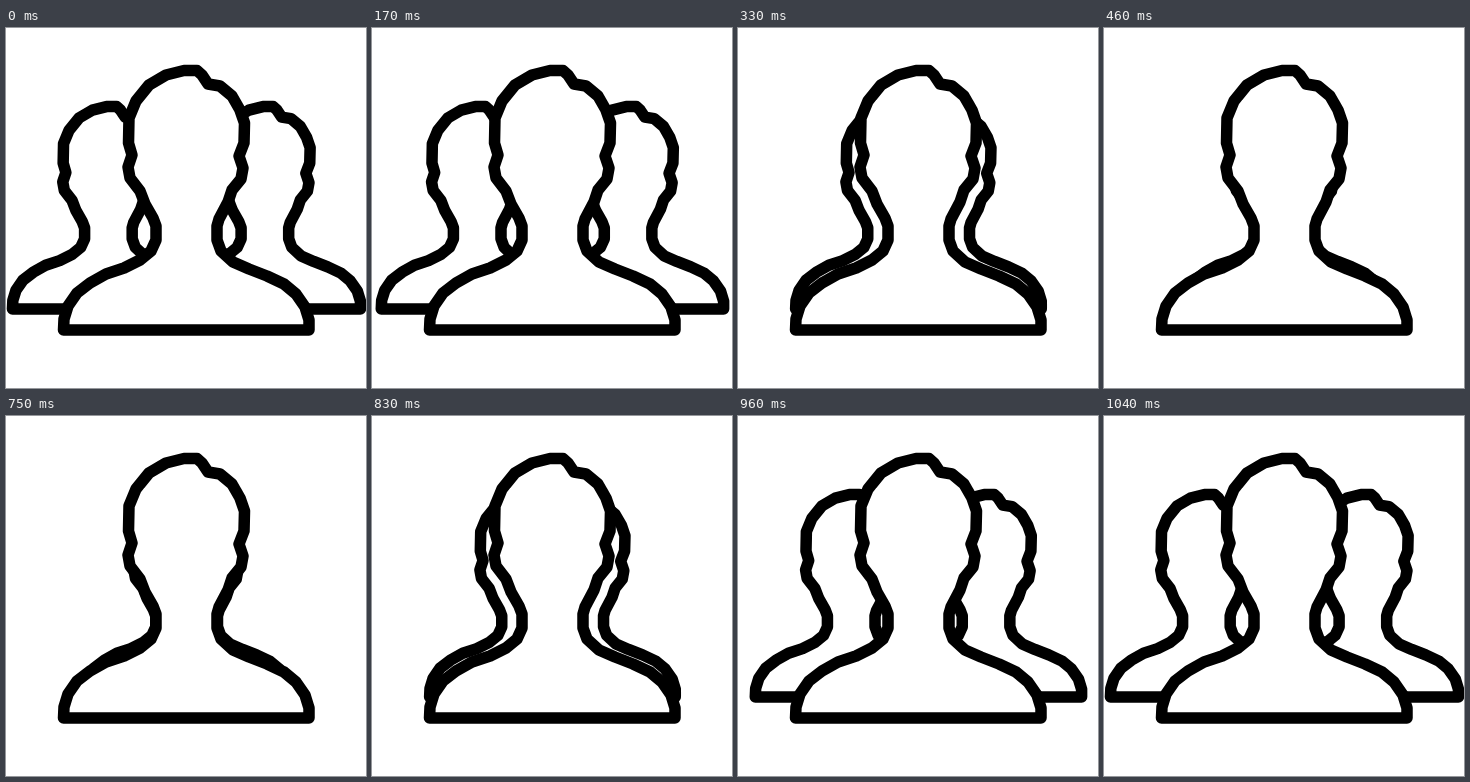
Recreate the animation shown at these times as an HTML page. Size 360 by 360 pixels, loop 1.18 s.

```html
<!DOCTYPE html>
<html>
<head>
<meta charset="utf-8">
<style>
  html, body { margin: 0; height: 100%; overflow: hidden; background: #fff; }
  svg { display: block; width: 100vw; height: 100vh; }
  path { fill: #fff; stroke: #000; stroke-width: 11.5; stroke-linejoin: round; vector-effect: non-scaling-stroke; }
</style>
</head>
<body>
<svg viewBox="0 0 360 360">
  <defs>
    <path id="person" d="M57.5 302 58 291 62 278 71 265 84 255 100 246 118 240 134 232 145 223 150 212 150 198
      147 190 139 176 134 163 124 150 122 139 126 127 122.5 115 123 90 130 73 143 57 160 47 178 42.5 191 42.5
      196 47 202 56 214 58 226 68 234 82 238.5 95 238 115 233 128 237 140 235 151 226 162 222 174 213 191
      211 198 211 212 215 223 227 234 243 241 261 248 278 256 290 266 299 279 303 292 303 302Z"/>
  </defs>
  <use id="left" href="#person"/>
  <use id="right" href="#person"/>
  <use href="#person"/>
</svg>
<script>
const LOOP = 1180, TRAVEL = 74, SCALE = 0.78;
const left = document.getElementById('left');
const right = document.getElementById('right');
const closing = [170, 210, 250, 290, 330, 380, 420, 460];
const opening = [750, 790, 830, 880, 920, 960, 1000, 1040];

// Eased share of the steps that have begun by time t
function progress(steps, t) {
  const done = steps.filter(s => t >= s).length / steps.length;
  return (1 - Math.cos(Math.PI * done)) / 2;
}

// Places a smaller figure with its middle at x
function place(el, x) {
  el.setAttribute('transform', `translate(${x} 281) scale(${SCALE}) translate(-180 -302)`);
}

function draw() {
  const t = performance.now() % LOOP;
  const shift = TRAVEL * (progress(closing, t) - progress(opening, t));
  place(left, 102 + shift);
  place(right, 258.5 - shift);
  requestAnimationFrame(draw);
}
draw();
</script>
</body>
</html>
```
